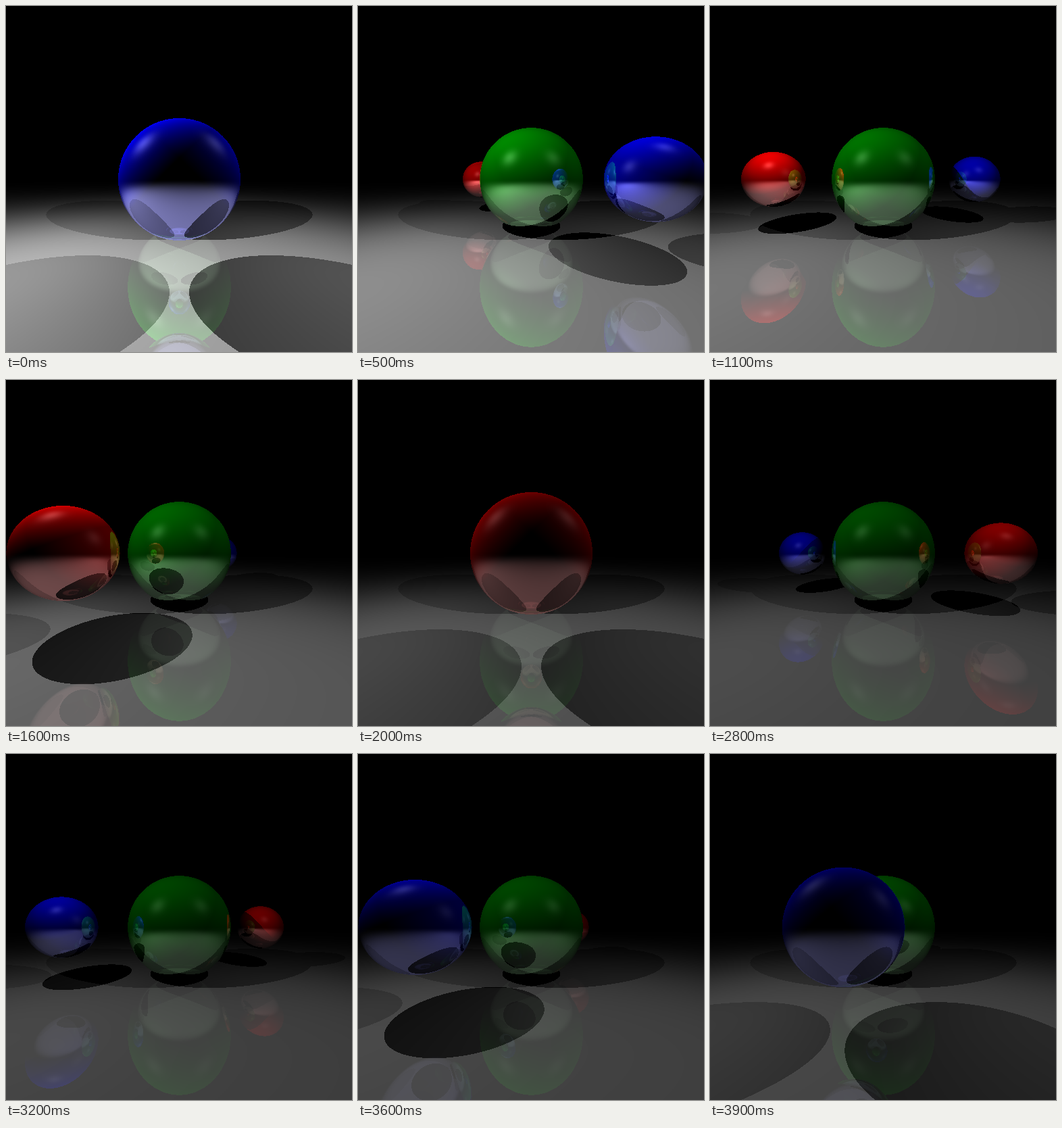
An HTML page with a canvas that plays this animation: 512x512 px, repeating every 4 s.

```html
<!DOCTYPE html>
<html lang="en">
<head>
<meta charset="utf-8">
<title>Orbiting spheres</title>
<style>
  html, body { margin: 0; width: 100%; height: 100%; overflow: hidden; background: #000; }
  canvas { display: block; width: 512px; height: 512px; }
</style>
</head>
<body>
<canvas id="stage" width="512" height="512"></canvas>
<script>
const SIZE = 512, HALF = SIZE / 2, TOP = 160;
const LOOP = 4000, STEP = 100;
const FLOOR = -1, BOUNCES = 4;
const FLOOR_MIRROR = 0.25, BALL_MIRROR = 0.7, TINT = 0.35;
const BALL_GAIN = 1.5, GLOSS = 0.4, SHINE = 24;

const balls = [
  { x: 0, y: 0, z: 3.5, r: 1, color: [0, 0.6, 0] },
  { x: 0, y: 0, z: 0, r: 0.5, color: [0, 0, 1] },
  { x: 0, y: 0, z: 0, r: 0.5, color: [1, 0, 0] }
];
const lights = [
  { x: -2, y: 2, z: 1.5, power: 0 },
  { x: 2, y: 2, z: 1.5, power: 0 }
];
// time in ms, power of the left light, power of the right light
const dimming = [
  [0, 465, 250], [500, 355, 185], [1100, 295, 162], [2000, 215, 143],
  [2400, 196, 122], [3200, 172, 112], [4000, 176, 122]
];

const ctx = document.getElementById('stage').getContext('2d');
const cache = [];
const out = [0, 0, 0];

function setScene(t) {
  const a = 2 * Math.PI * t / LOOP;
  [1, -1].forEach((side, i) => {
    balls[i + 1].x = 2 * side * Math.sin(a);
    balls[i + 1].z = 3.5 - 2 * side * Math.cos(a);
  });
  const k = dimming.findIndex(row => row[0] > t);
  const from = dimming[k - 1], to = dimming[k];
  const f = (t - from[0]) / (to[0] - from[0]);
  lights.forEach((l, i) => { l.power = from[i + 1] + f * (to[i + 1] - from[i + 1]); });
}

function hitBall(b, ox, oy, oz, dx, dy, dz) {
  const x = b.x - ox, y = b.y - oy, z = b.z - oz;
  const m = x * dx + y * dy + z * dz;
  if (m <= 0) return Infinity;
  const disc = m * m - x * x - y * y - z * z + b.r * b.r;
  if (disc < 0) return Infinity;
  const t = m - Math.sqrt(disc);
  return t > 1e-4 ? t : Infinity;
}

function shadowed(px, py, pz, vx, vy, vz, vv) {
  for (let i = 0; i < 3; i++) {
    const b = balls[i];
    const x = b.x - px, y = b.y - py, z = b.z - pz;
    const m = x * vx + y * vy + z * vz;
    if (m > 0 && m < vv && x * x + y * y + z * z - m * m / vv < b.r * b.r) return true;
  }
  return false;
}

function trace(dx, dy, dz) {
  let ox = 0, oy = 0, oz = 0, wr = 1, wg = 1, wb = 1;
  out[0] = out[1] = out[2] = 0;
  for (let n = 0; n < BOUNCES; n++) {
    let near = dy < 0 ? (FLOOR - oy) / dy : Infinity, ball = null;
    if (near < 1e-4) near = Infinity;
    for (let i = 0; i < 3; i++) {
      const t = hitBall(balls[i], ox, oy, oz, dx, dy, dz);
      if (t < near) { near = t; ball = balls[i]; }
    }
    if (near === Infinity) return;

    ox += near * dx; oy += near * dy; oz += near * dz;
    let nx = 0, ny = 1, nz = 0;
    if (ball) {
      nx = (ox - ball.x) / ball.r;
      ny = (oy - ball.y) / ball.r;
      nz = (oz - ball.z) / ball.r;
    }
    const turn = 2 * (dx * nx + dy * ny + dz * nz);
    dx -= turn * nx; dy -= turn * ny; dz -= turn * nz;

    let diffuse = 0, gloss = 0;
    for (let i = 0; i < 2; i++) {
      const l = lights[i];
      const vx = l.x - ox, vy = l.y - oy, vz = l.z - oz;
      const facing = nx * vx + ny * vy + nz * vz;
      if (facing <= 0) continue;
      const vv = vx * vx + vy * vy + vz * vz;
      if (shadowed(ox, oy, oz, vx, vy, vz, vv)) continue;
      diffuse += l.power * facing / vv;
      if (ball) {
        const d = Math.sqrt(vv);
        const c = (dx * vx + dy * vy + dz * vz) / d;
        if (c > 0.7) gloss += GLOSS * l.power / d * Math.pow(c, SHINE);
      }
    }

    if (ball) {
      const [r, g, b] = ball.color;
      diffuse *= BALL_GAIN;
      out[0] += wr * (r * diffuse + gloss);
      out[1] += wg * (g * diffuse + gloss);
      out[2] += wb * (b * diffuse + gloss);
      wr *= BALL_MIRROR + TINT * r;
      wg *= BALL_MIRROR + TINT * g;
      wb *= BALL_MIRROR + TINT * b;
    } else {
      out[0] += wr * diffuse;
      out[1] += wg * diffuse;
      out[2] += wb * diffuse;
      wr *= FLOOR_MIRROR; wg *= FLOOR_MIRROR; wb *= FLOOR_MIRROR;
    }
  }
}

function render(step) {
  setScene(step * STEP);
  const image = ctx.createImageData(SIZE, SIZE - TOP);
  const data = image.data;
  let p = 0;
  for (let row = TOP; row < SIZE; row++) {
    const y = (HALF - row) / HALF;
    for (let col = 0; col < SIZE; col++) {
      const x = (col - HALF) / HALF;
      const s = 1 / Math.sqrt(x * x + y * y + 1);
      trace(x * s, y * s, s);
      data[p++] = out[0];
      data[p++] = out[1];
      data[p++] = out[2];
      data[p++] = 255;
    }
  }
  return image;
}

ctx.fillRect(0, 0, SIZE, SIZE);
let shown = -1;
const start = performance.now();

function draw() {
  const t = Math.max(0, performance.now() - start) % LOOP;
  const step = Math.floor(t / STEP);
  if (step !== shown) {
    cache[step] = cache[step] || render(step);
    ctx.putImageData(cache[step], 0, TOP);
    shown = step;
  }
  requestAnimationFrame(draw);
}
draw();
</script>
</body>
</html>
```
